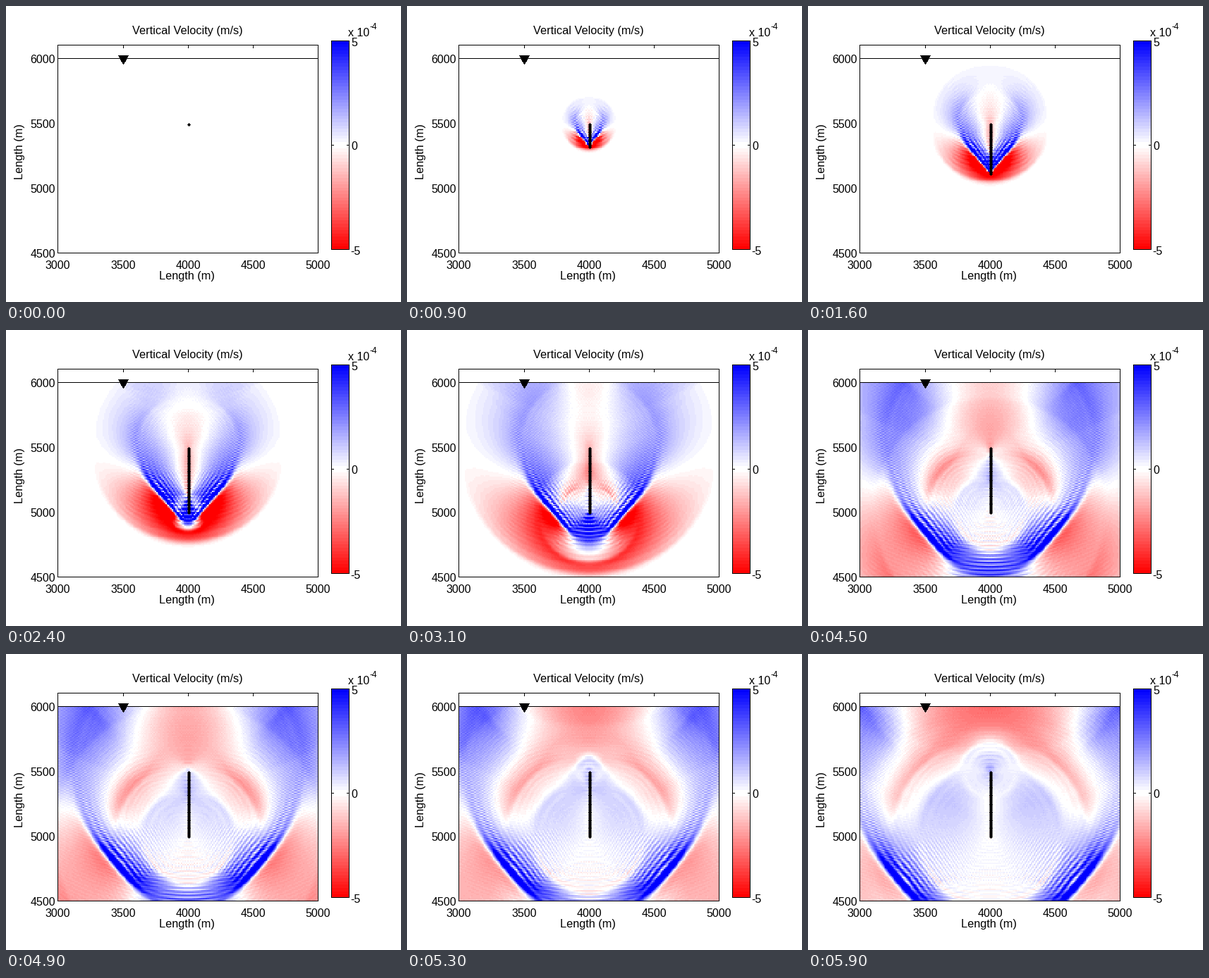
Recreate the animation shown at these times as a matplotlib script. Size 560 px wide and 420 px high, loop 6 s.

```python
import numpy as np
import matplotlib.pyplot as plt
from matplotlib.animation import FuncAnimation
from matplotlib.colors import ListedColormap
from matplotlib.patches import Polygon, Rectangle

plt.rcParams["font.family"] = "Liberation Sans"

W, H = 560, 420
FRAMES, HOLD, SUBSTEPS = 60, 3, 6
ROWS, COLS, PAD = 151, 201, 60     # visible 10 m cells, hidden margin
TOP_ROW, POINTS = 51, 50           # crack from 5495 m down to 5005 m
STIFF, LAME, SHEAR = 0.36, 0.142, 0.109


def fwd(a, axis):
    return np.roll(a, -1, axis) - a


def bwd(a, axis):
    return a - np.roll(a, 1, axis)


def broken(substep):
    return min(substep // 2, POINTS)


def simulate(steps):
    """Vertical velocity around a pressurised crack, staggered elastic grid."""
    shape = (ROWS + PAD, COLS + 2 * PAD)
    vx, vy, sxx, syy, sxy = (np.zeros(shape) for _ in range(5))
    mid = PAD + COLS // 2
    snaps = [np.zeros((ROWS, COLS))]
    for s in range(1, steps * SUBSTEPS + 1):
        exx, eyy = bwd(vx, 1), bwd(vy, 0)
        sxx += STIFF * exx + LAME * eyy
        syy += LAME * exx + STIFF * eyy
        sxy += SHEAR * (fwd(vx, 0) + fwd(vy, 1))
        # opening holds the normal stress of broken cells at the pressure
        crack = (slice(TOP_ROW, TOP_ROW + broken(s)), mid)
        drop = -1 - sxx[crack]
        sxx[crack] += drop
        syy[crack] += LAME / STIFF * drop
        for stress in (sxx, syy, sxy):
            stress[0] = 0          # free surface
        vx += fwd(sxx, 1) + bwd(sxy, 0)
        vy += bwd(sxy, 1) + fwd(syy, 0)
        if s % SUBSTEPS == 0:
            snaps.append(-vy[:ROWS, PAD:PAD + COLS])
    snaps = np.array(snaps)
    lobe = snaps[34, 95:116, 45:66]
    return snaps * 4.3 / -np.percentile(lobe, 5)


def px(x):
    return 73.5 + (x - 3000) * 0.1845


def py(z):
    return 350.5 - (z - 4500) * 0.184


fields = simulate(FRAMES - 1 - HOLD)

fade = np.linspace(0, 1, 32)
one = np.ones(32)
reds = np.column_stack([one, fade, fade])
cmap = ListedColormap(np.vstack([reds, reds[::-1, ::-1]]))

fig = plt.figure(figsize=(W / 100, H / 100), dpi=100, facecolor="white")
ax = fig.add_axes([0, 0, 1, 1])


def fill(x, y, w, h):
    ax.add_patch(Rectangle((x, y), w, h, fc="black", lw=0,
                           antialiased=False, zorder=3))


def frame(x0, y0, x1, y1):
    for y in (y0, y1):
        fill(x0, y, x1 - x0 + 1, 1)
    for x in (x0, x1):
        fill(x, y0, 1, y1 - y0 + 1)


def label(x, y, text, ha="center", size=16, **kw):
    ax.text(x, y, text, ha=ha, va=kw.pop("va", "baseline"),
            fontsize=size * 0.72, color="black", **kw)


image = ax.imshow(fields[0], cmap=cmap, vmin=-5, vmax=5, aspect="auto",
                  interpolation="nearest", zorder=1,
                  extent=(px(2995), px(5005), py(4495), py(6005)))
image.set_clip_path(Rectangle((73, 74), 370, 277, transform=ax.transData))

ax.imshow(np.linspace(5, -5, 64)[:, None], cmap=cmap, vmin=-5, vmax=5,
          aspect="auto", interpolation="nearest", zorder=1,
          extent=(461, 487, 346, 49))

frame(73, 55, 442, 350)
frame(461, 49, 486, 345)
fill(73, 74, 370, 1)
for x in (166, 258, 350):
    fill(x, 55, 1, 5)
for x in (461, 483):
    fill(x, 197, 4, 1)

ax.add_patch(Polygon([(159.5, 70), (173.5, 70), (166.5, 82.5)], fc="black",
                     lw=0, antialiased=False, zorder=4))
crack_z = 5490 - 10 * np.arange(POINTS)
dots, = ax.plot([], [], "D", color="black", ms=2.6, mew=0,
                antialiased=False, zorder=5)

label(257, 40, "Vertical Velocity (m/s)", size=16.3)
label(256, 388, "Length (m)", size=16.3)
label(19.5, 207, "Length (m)", size=16.3, rotation=90, va="center")
for x in range(3000, 5001, 500):
    label(px(x), 373, str(x))
for z in range(4500, 6001, 500):
    label(70, py(z) + 6.5, str(z), ha="right")
label(489, 57, "5", ha="left")
label(489, 204, "0", ha="left")
label(488, 353, "-5", ha="left")
label(485, 43, "x 10", ha="left")
label(515, 33, "-4", ha="left", size=12)

ax.set_xlim(0, W)
ax.set_ylim(H, 0)
ax.axis("off")


def draw(i):
    step = max(0, i - HOLD)
    image.set_data(fields[step])
    z = crack_z[:max(1, broken(step * SUBSTEPS))]
    dots.set_data(np.full(len(z), 258.5), py(z))
    return image, dots


anim = FuncAnimation(fig, draw, frames=FRAMES, interval=100,
                     repeat=True, repeat_delay=0)
plt.show()
```
